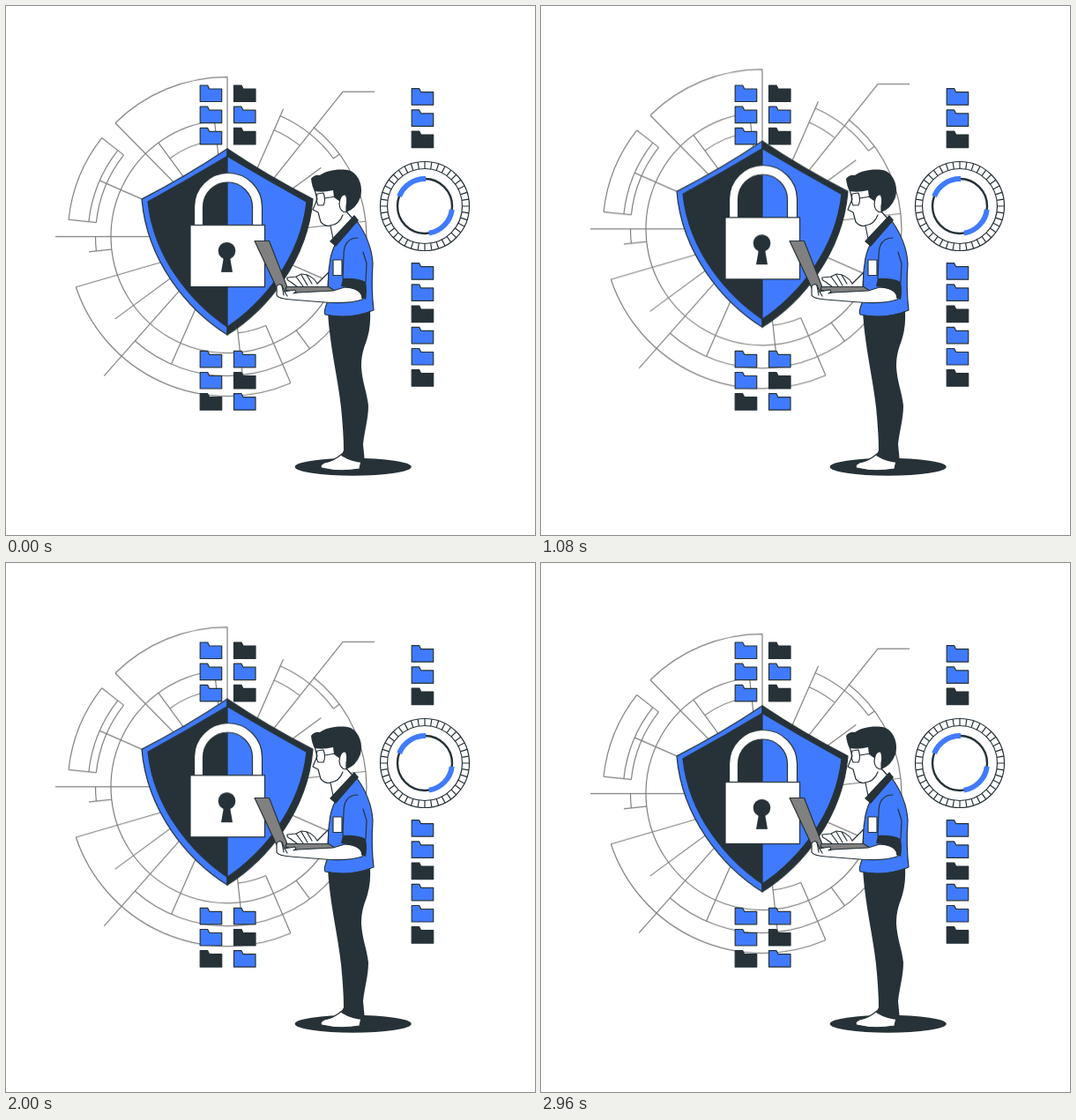
Recreate the animation shown at these times as an HTML page. Size 600 by 600 pixels, loop 3000 ms.

```html
<!DOCTYPE html>
<html lang="en">
<head>
<meta charset="utf-8">
<title>Data protection</title>
<style>
  html, body { margin: 0; width: 100%; height: 100%; overflow: hidden; background: #fff; }
  svg { display: block; width: 100%; height: 100%; }
  .dark { fill: #263238; }
  .blue { fill: #407bff; }
  .white { fill: #fff; }
  .gray { fill: #808080; }
  .line { fill: none; }
  .ink { stroke: #263238; stroke-width: 1.2; stroke-linejoin: round; stroke-linecap: round; }
  #web { fill: none; stroke: #808080; stroke-width: 1.2; }
  #float { animation: float 1.5s linear -20ms infinite alternate; }
  @keyframes float {
    to { transform: translateY(-12px); }
  }
</style>
</head>
<body>
<svg viewBox="0 0 600 600">
  <defs>
    <path id="folder" class="ink" d="M0 0H8.5L10.5 4H24.5V18.5H0Z"/>
    <path id="outerHalf" d="M0 -99.5Q-47 -68 -97 -42.5C-91 28 -45 83 0 111.5Z"/>
    <path id="innerHalf" class="ink" d="M0 -91Q-45 -64 -90 -39.5C-83 26 -39 76 0 102.5Z"/>
  </defs>

  <g id="float">
    <path id="web"/>
    <g transform="translate(251 261.6)">
      <use href="#outerHalf" class="blue ink"/>
      <use href="#innerHalf" class="dark"/>
      <use href="#outerHalf" class="dark ink" transform="scale(-1 1)"/>
      <use href="#innerHalf" class="blue" transform="scale(-1 1)"/>
    </g>
    <g class="white ink">
      <path d="M213.500 248.700V228A38.500 38.500 0 0 1 290.500 228V248.700H279.500V228A28 28 0 0 0 223.500 228V248.700Z"/>
      <path d="M209 248.700H293.500V318.700H209Z"/>
    </g>
    <circle class="dark" cx="250.500" cy="277.700" r="9.800"/>
    <path class="dark" d="M247.500 282H253.500L257 302H244Z"/>
  </g>

  <g id="folders"></g>

  <g fill="none" stroke="#263238" stroke-width="1.200">
    <circle class="white" cx="475" cy="227" r="50.500"/>
    <circle cx="475" cy="227" r="42.500"/>
    <path id="ticks"/>
    <circle cx="475" cy="227" r="31" stroke-width="2.400"/>
    <path id="gauge" stroke="#407bff" stroke-width="6"/>
  </g>

  <ellipse class="dark" cx="393.700" cy="522.700" rx="66" ry="10"/>

  <g id="person">
    <path class="white ink" d="M381 508Q372 516 361 518Q355 521 358 524Q378 529 401 525L403 516Z"/>
    <path class="dark" d="M365 346C367 385 377 425 380 455Q383 485 383 504L380 510Q393 518 407 518L405 497C407 480 411 468 411 453C409 436 404 427 403 409C403 393 407 386 410 376Q414 362 413 345Z"/>

    <!-- far arm and typing hand -->
    <path class="white ink" d="M366 302L353 315Q347 304 335 304L329 307L319 308Q318 311 323 313L331 319H365Z"/>
    <path class="line ink" d="M329 307L337 318M335 305L342 317M341 305L347 315"/>

    <path class="blue ink" d="M398 244C408 258 415 275 416 292Q414 320 417 345Q390 356 362 350Q360 347 364 337C367 322 364 310 367 293Q368 281 374 269Z"/>
    <path class="line ink" d="M399 263C386 263 383 273 383 283L382 309M405 279L409 292L408 313"/>
    <path class="white ink" d="M371 288H381V305.500H371Z"/>

    <!-- head -->
    <path class="white ink" d="M350 208L353 219L348 231L354 234L357 245Q363 251 368 249L371 264L393 241L386 233L388 205Z"/>
    <path class="line ink" d="M368 249Q378 248 382 237"/>
    <path class="dark" d="M346 196Q350 191 356 192C364 186 380 184 391 187C402 193 405 207 402 217Q397 230 386 234L379 222L372 217L371 209Q359 212 350 210Q347 205 346 196Z"/>
    <path class="white ink" d="M386 234Q379 234 378 225Q379 213 385 214Q388 218 386 227Z"/>
    <path class="line ink" d="M353 213L360 212Q363 220 360 226L354 226Q351 220 353 213ZM362 218L374 216"/>
    <path class="dark" d="M395 237L400 243L374 273L367 267Z"/>

    <!-- laptop -->
    <path class="gray ink" d="M282 266.500H298.500L319 319L318 324H309Z"/>
    <path class="gray ink" d="M318 318.500H366L373 323L329 325.500L317 322Z"/>

    <!-- near arm -->
    <path class="white ink" d="M307 318Q310 314 313 317L316 324L327 322Q331 324 326 326L331 325L371 323L384 319Q400 320 406 326L404 333Q389 338 361 336L323 333Q309 332 307 328Z"/>
    <path class="line ink" d="M313 317L315 328M316 324L319 329"/>
    <path class="dark" d="M382 309Q398 308 408 313Q410 323 408 333L403 331Q404 321 380 318Z"/>
  </g>
</svg>
<script>
  const $ = id => document.getElementById(id);

  const polar = (cx, cy) => {
    const at = (r, deg) => {
      const a = deg * Math.PI / 180;
      return (cx + r * Math.cos(a)).toFixed(2) + ' ' + (cy + r * Math.sin(a)).toFixed(2);
    };
    const arc = (r, a, b) => `M${at(r, a)}A${r} ${r} 0 ${+(b - a > 180)} 1 ${at(r, b)}`;
    const ray = (a, from, to) => `M${at(from, a)}L${at(to, a)}`;
    return { arc, ray };
  };

  // Radar web: five rings and twelve spokes, the shield hides the middle
  const { arc, ray } = polar(251, 261.6);
  const [inner, ring, mid, outer, rim] = [110, 132, 149.5, 158, 181];
  const spoke = k => 23.7 + 30 * k;
  const spokes = (ks, from, to) => ks.map(k => ray(spoke(k), from, to)).join('');
  const sector = (r1, r2, a, b) => arc(r1, a, b) + arc(r2, a, b) + ray(a, r1, r2) + ray(b, r1, r2);

  $('web').setAttribute('d', [
    spokes([0, 2, 3, 4, 6, 9, 11], 0, outer),
    spokes([7, 8, 10], 0, ring),
    spokes([1, 5], ring, outer),
    spokes([10], mid, outer),
    sector(mid, rim, 186.1, 218.2), arc(outer, 186.1, 218.2),
    sector(0, rim, 225.4, 270),
    arc(rim, 66.6, 161.5), ray(66.6, inner, rim), arc(inner, 66.6, spoke(2)),
    arc(outer, -51.8, 131.5), ray(131.5, 0, 211),
    arc(ring, 30, spoke(8)), arc(inner, spoke(7), spoke(8)),
    arc(mid, spoke(9), spoke(10)), arc(ring, spoke(9), 308.2),
    arc(mid, spoke(5), 180), ray(180, 0, 195),
    'M79 319L175 291M418 97.4H382L251 261.6'
  ].join(''));

  // Dial
  const dial = polar(475, 227);
  const tickCount = 40;
  $('ticks').setAttribute('d', Array.from({ length: tickCount },
    (_, i) => dial.ray(i * 360 / tickCount, 42.5, 50.5)).join(''));
  $('gauge').setAttribute('d', dial.arc(31, 201, 272) + dial.arc(31, 7, 81));

  // Folder stacks, colours from top to bottom
  const stack = (x, y, colours) => [...colours].map((c, i) =>
    `<use href="#folder" class="${c === 'b' ? 'blue' : 'dark'}" x="${x}" y="${y + i * 24.2}"/>`
  ).join('');
  $('folders').innerHTML =
    stack(220.2, 90, 'bbb') + stack(258.5, 90, 'dbd') +
    stack(220.2, 391.3, 'bbd') + stack(258.5, 391.3, 'bdb') +
    stack(460.2, 93.7, 'bbd') + stack(460.2, 291.7, 'bbdbbd');
</script>
</body>
</html>
```
